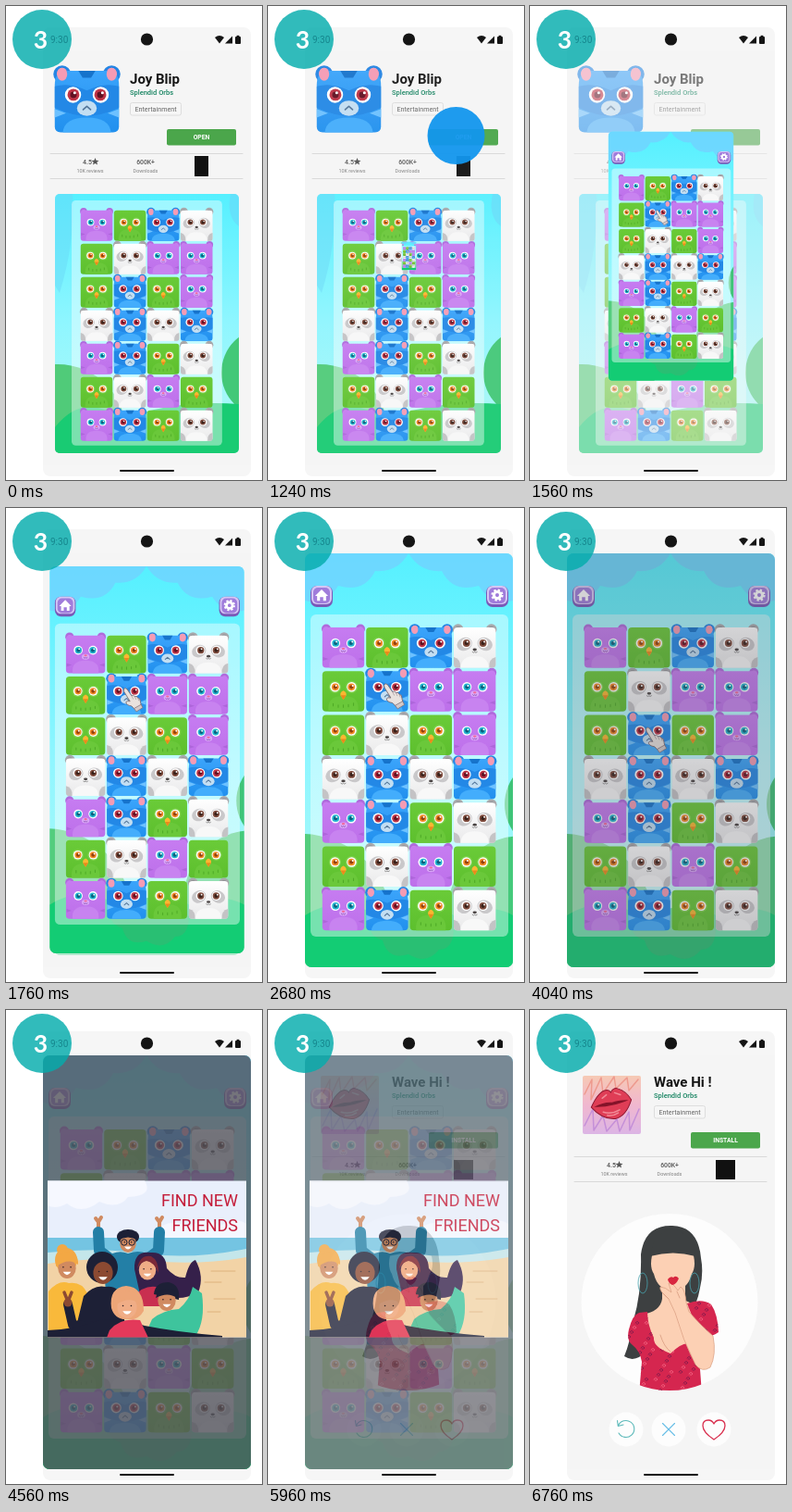
Animation of 277x512 px, one loop 8.44 s. Source, as an HTML page:

```html
<!DOCTYPE html>
<html lang="en">
<head>
<meta charset="utf-8">
<style>
html, body { margin: 0; width: 100%; height: 100%; overflow: hidden; background: #fff; }
svg { display: block; width: 100vw; height: 100vh; font-family: Roboto, sans-serif; }
</style>
</head>
<body>
<svg id="stage" viewBox="0 0 277 512"></svg>
<script>
// Markup helpers
const circle = (x, y, r, fill, more = '') => `<circle cx="${x}" cy="${y}" r="${r}" fill="${fill}" ${more}/>`;
const oval = (x, y, rx, ry, fill, more = '') => `<ellipse cx="${x}" cy="${y}" rx="${rx}" ry="${ry}" fill="${fill}" ${more}/>`;
const rect = (x, y, w, h, r, fill, more = '') => `<rect x="${x}" y="${y}" width="${w}" height="${h}" rx="${r}" fill="${fill}" ${more}/>`;
const path = (d, fill, more = '') => `<path d="${d}" fill="${fill}" ${more}/>`;
const line = (d, color, w = 1, more = '') => `<path d="${d}" fill="none" stroke="${color}" stroke-width="${w}" stroke-linecap="round" stroke-linejoin="round" ${more}/>`;
const text = (x, y, size, fill, str, more = '') => `<text x="${x}" y="${y}" font-size="${size}" fill="${fill}" ${more}>${str}</text>`;
const group = (inner, more = '') => `<g ${more}>${inner}</g>`;
const use = (id, x, y, s = 1, more = '') => `<use href="#${id}" transform="translate(${x} ${y}) scale(${s})" ${more}/>`;
const both = part => part(-1) + part(1);
const gradient = (id, ...colors) => `<linearGradient id="${id}" x2="0" y2="1">${colors.map((c, i) =>
  `<stop offset="${i / (colors.length - 1)}" stop-color="${c}"/>`).join('')}</linearGradient>`;
const mid = 'text-anchor="middle"', bold = 'font-weight="500"';

// Animal tiles, centred on 0,0
const eyes = (x, r, iris, dark) => both(s => circle(s * x, -3, r, '#fff') + circle(s * (x - .3), -3, r * .74, iris) +
  circle(s * (x - .3), -3, r * .4, dark) + circle(s * x + 1.2, -4.4, 1, '#fff'));
const body = fill => rect(-22.7, -20, 45.4, 43.5, 4, fill);

const cat = both(s => circle(s * 18.5, -18.5, 5, '#b06add') + circle(s * 18.5, -18, 2.8, '#c884ec')) +
  body('url(#gCat)') + path('M-15 23.5Q-17 9 0 9Q17 9 15 23.5Z', '#c883f0') +
  eyes(8.6, 5.2, '#21b4cf', '#0c5f7c') + oval(0, 4.5, 4.4, 3.2, '#dba9f8') +
  oval(0, 3, 1.8, 1.1, '#f2699c') + line('M-2.2 5.5Q-1 7 0 5.5Q1 7 2.2 5.5', '#8045a8', .8) +
  both(s => path(`M${s * 22} 12l${-s * 6} 2l${s * 6} 2z`, '#ad66da'));

const owl = body('url(#gOwl)') + path('M-16 23.5Q-18 6 0 7Q18 6 16 23.5Z', '#6ac83a') +
  both(s => circle(s * 9, -3, 6.6, '#7fd24c')) + eyes(9, 5.2, '#f28a25', '#93400d') +
  path('M0 1Q4 3 3 6L0 11L-3 6Q-4 3 0 1Z', '#fbb731') + path('M-3 6h6L0 11Z', '#ea8a1c') +
  line('M-11 15v2.5m5.5 -1v2.5m5.5 -2.5v2.5m5.5 -3v2.5m5.5 -4v2.5', '#4fab27', 1.1);

const mouse = both(s => circle(s * 17.5, -17.5, 6.2, '#2485e4') + oval(s * 17.5, -17.5, 3.8, 4.6, '#f59bb4')) +
  path('M-14 -20H14Q22.7 -20 22.7 -10V19.5Q22.7 23.5 18.5 23.5H-18.5Q-22.7 23.5 -22.7 19.5V-10Q-22.7 -20 -14 -20Z', 'url(#gMouse)') +
  path('M-6 -20H6L3 -15H-3Z', '#1673cb') +
  path('M-22.7 -9Q-12 -12 0 -6Q12 -12 22.7 -9V6Q10 12 0 12Q-10 12 -22.7 6Z', '#2388e6') +
  path('M-17 23.5Q-16 13 0 13Q16 13 17 23.5Z', '#43adfc') +
  both(s => oval(s * 17.5, -17.5, 3.6, 4.6, '#f59bb4') + path(`M${s * 22.7} 7l${-s * 8} 3l${s * 8} 3z`, '#6dc1ff')) +
  eyes(9.8, 5.7, '#bf3346', '#611122') + oval(0, 6.5, 7, 5.4, '#c3def2') + line('M-2.6 7.5L0 5.2L2.6 7.5', '#55779a', 1.1);

const panda = both(s => circle(s * 18, -18, 5.8, '#a8a8ab') + circle(s * 18, -18, 3.2, '#929296')) +
  body('url(#gPanda)') + path('M-15 23.5Q-15 11 0 11Q15 11 15 23.5Z', '#f8f8f8') +
  both(s => oval(s * 11, -2, 8.4, 7, '#c9c8ca', `transform="rotate(${s * 25} ${s * 11} -2)"`) +
    path(`M${s * 22.7} 12q${-s * 8} 2 ${-s * 7} 11.5h${s * 4}q${s * 3} 0 ${s * 3} -4z`, '#c4c3c5')) +
  eyes(9.2, 5.3, '#7d4a3c', '#392019') + oval(0, 4, 2.2, 1.4, '#4b4545') +
  line('M-2.6 6.5Q-1 8 0 6.5Q1 8 2.6 6.5', '#777', .8);

const hand = path('M-8 -11Q-6 -14 -3.5 -11L2 -3Q4 -5 6 -2Q9 -3 10 0Q13 0 13 4L14 9L6 14L2 10Q-5 9 -5 5Q-4 3 0 4L-7.5 -8Z',
  '#e9e2de', 'stroke="#7b6a72" stroke-width="1"') + line('M2 -3l2 4m2 -3l1.5 3.5m2.5 -1.5l1 3', '#a8989c', .8) +
  path('M5 13l9 -5l2 4l-8 5z', '#d3c9c8', 'stroke="#7b6a72" stroke-width=".8"');

// Board
const kinds = { c: 'cat', o: 'owl', m: 'mouse', p: 'panda' };
const rows = ['comp', 'o.cc', 'o.oc', 'pmpm', 'cmop', 'opco', 'cmop'];
const colX = c => 81.5 + 47.4 * c, rowY = r => 149 + 47.3 * r;
const board = rect(46, 115, 214, 348, 6, '#fff', 'opacity=".42"') + rows.map((row, r) => [...row].map((k, c) =>
  k === '.' ? '' : use(kinds[k], colX(c), rowY(r))).join('')).join('');

const roundButton = (x, icon) => group(rect(-12, -11, 24, 23, 7, '#7a59b8') + rect(-11, -11, 22, 20, 6, '#d5c6f4') +
  rect(-9, -9, 18, 17, 5, '#a07cdb') + group(icon, 'transform="scale(.88)"'), `transform="translate(${x} 95)"`);
const house = path('M-8 0L0 -8L8 0H5.5V6H2V1.5H-2V6H-5.5V0Z', '#fff');
const gear = circle(0, -1, 4, 'none', 'stroke="#fff" stroke-width="3.4"') +
  circle(0, -1, 6.2, 'none', 'stroke="#fff" stroke-width="2.6" stroke-dasharray="2.6 2.27"');

const game = rect(40, 49, 225, 447, 7, 'url(#gSky)') + group(
  path('M40 100Q62 106 76 84Q104 92 116 68Q140 70 152 49Q165 70 188 68Q200 92 228 84Q242 106 265 100V49H40Z', '#72d2ff', 'opacity=".8"') +
  circle(307, 320, 51, '#3fc478') + circle(36, 450, 98, '#53cd7d') + circle(275, 434, 80, '#45ca7b') +
  path('M40 440Q80 415 120 442Q170 420 205 442Q240 425 265 440V496H40Z', '#13cc74') +
  path('M112 440Q105 462 124 467Q130 489 152 482Q172 494 185 477Q205 477 200 440Z', '#29bf73'), 'clip-path="url(#screen)"') +
  board + use('panda', colX(1), rowY(2), 1, 'id="pandaMove"') +
  group(use('mouse', 0, 0) + use('hand', 4, 5, .92), 'id="mouseMove"') + roundButton(58, house) + roundButton(248, gear);

// Store pages
const star = path('M0 -4L1.1 -1.2L4 -1L1.8 .8L2.5 3.6L0 2L-2.5 3.6L-1.8 .8L-4 -1L-1.1 -1.2Z', '#555', 'transform="translate(96.5 168)"');
const store = (title, action, rating) =>
  text(134, 84, 15, '#151515', title, 'font-weight="600"') +
  text(134, 95.6, 7.5, '#178461', 'Splendid Orbs', bold) +
  rect(134.5, 104.5, 55, 13.5, 2, '#f6f6f6', 'stroke="#ddd"') + text(162, 113.7, 7.2, '#666', 'Entertainment', mid) +
  rect(174, 133, 75, 17.5, 2, '#4ba64b') + text(211.5, 144.2, 6.8, '#fff', action, mid + ' font-weight="600"') +
  line('M48 159.5H256M48 186.5H256', '#d2d2d2', .8) +
  text(83, 171, 7, '#555', '4.5', bold) + star + text(91, 180, 5.4, '#808080', '10K reviews', mid) +
  text(151, 171, 6.8, '#555', '600K+', mid + ' ' + bold) + text(151, 180, 5.4, '#808080', 'Downloads', mid) + rating;
const sheet = rect(40, 49, 225, 447, 0, '#f5f5f5');

const preview = group(rect(53, 203, 199, 280, 0, 'url(#gSky)') +
  path('M53 203H72Q75 255 58 310L53 302Z', '#6ad9f8', 'opacity=".5"') + path('M243 203H252V238Q238 228 243 203Z', '#6ad9f8', 'opacity=".6"') +
  circle(281, 396, 48, '#43c878') + circle(56, 461, 74, '#50cb79') +
  path('M53 455Q85 415 125 447Q180 425 252 430V483H53Z', '#19cb73') +
  group(board + use('panda', colX(1), rowY(1)) + use('mouse', colX(1), rowY(2)), 'transform="translate(36 122.5) scale(.761)"'),
  'clip-path="url(#card)"');

const gamePage = sheet + group(store('Joy Blip', 'OPEN', rect(204, 162, 15, 22, 0, '#111')) +
  use('mouse', 87.5, 100.5, 1.53) + preview, 'id="gameInfo"');

const lips = rect(57, 72, 63, 63, 2, 'url(#gLips)') +
  line('M59 92L67 76L66 98L77 74L79 91L91 73L93 86L105 74L107 88L117 76', '#ee9a8e', 1.5) +
  line('M59 126L68 108L69 131L79 115L83 132L94 119L97 132L107 111L108 131L118 108', '#c590d8', 1.5) +
  group(path('M-22 1Q-12 -15 -4 -15Q0 -15 1 -12Q5 -17 9 -15Q18 -11 22 -1Q14 16 2 17Q-12 16 -22 1Z', '#df3d56', 'stroke="#8e1730" stroke-width="1"') +
    path('M-19 1Q-7 -3 1 -1Q8 -3 19 -1Q8 2 1 2Q-8 3 -19 1Z', '#841329') +
    line('M-10 8Q-2 12 8 8M-6 12Q0 14 6 11M-9 -7l5 -3m9 -1l6 3', '#f28c98', 1.5), 'transform="translate(88 102) rotate(-8)"');

let dots = '';
for (let i = 0; i < 110; i++) {
  const x = 104 + i * 37 % 101, y = 314 + i * 53 % 98;
  dots += line(`M${x} ${y}q2 -3 4 0q-1 2 -3 1`, i % 3 ? '#8f1c4b' : '#ef5a7a', 1);
}
const dress = 'M118 327Q111 329 107 345Q104 357 111 362Q119 368 121 380L118 415H186L184 388L176 364Q170 354 152 371Q133 364 134 354Q127 340 127 326Z' +
  'M170 317Q186 311 196 318Q203 328 204 348Q196 354 184 352Z';
const skin = '#fcd0b4', ink = '#d99c80';
const woman = group(
  path('M154 233Q124 232 120 264Q121 305 112 335Q108 360 102 374Q114 382 126 368L140 330H172Q181 318 184 300Q188 284 185 268Q182 234 154 233Z', '#3d4041') +
  path('M143 292H168V314Q183 318 182 342L172 384H136Q124 355 121 329Q141 326 143 312Z', skin) +
  path('M134 258Q128 276 134 285Q138 302 154 304Q171 302 175 285Q181 276 175 258Z', skin) +
  path('M130 266Q133 240 154 237Q176 240 179 266Q155 259 130 266Z', '#3d4041') +
  path(dress, '#d5264f') + group(dots, 'clip-path="url(#dress)"') +
  path('M150 312Q139 303 141 299Q146 299 153 305L150 295Q154 294 160 303L163 299Q168 302 169 316L172 326Q186 342 198 352Q202 372 195 386Q186 392 179 383Q165 356 157 327Z', skin, `stroke="${ink}" stroke-width=".7"`) +
  line('M150 312l-6 -6m15 -2l3 7M141 351Q145 364 152 369', ink, .8) +
  path('M149 291Q152 287 155 289Q158 286 161 290Q158 297 154 297Q150 295 149 291Z', '#d8263f') +
  both(s => oval(150 + s * 28, 295, 5, 11, 'none', 'stroke="#4aa3ae" stroke-width=".8"')), 'clip-path="url(#portrait)"');

const datePage = sheet + group(store('Wave Hi !', 'INSTALL', rect(201, 163, 21, 21, 0, '#111')) + lips, 'transform="translate(0 -1)"') +
  circle(151, 315.5, 95.5, '#fdfdfd') + woman + [104, 150, 199].map(x => circle(x, 453, 18.5, '#fdfdfd')).join('') +
  line('M95.5 449A9 9 0 1 1 96 457M94.5 443.5L95.3 449.5L101 448', '#5bb9b9', 1.1) +
  line('M143.5 446.5l13 13m0 -13l-13 13', '#66bde6', 1.1) +
  line('M199 464Q187 456 187 449Q187 443 193 443Q197 443 199 447Q201 443 205 443Q211 443 211 449Q211 456 199 464Z', '#d92f4e', 1.3);

// Beach advert
const face = (x, y, r, tone) => oval(x, y, r * .88, r, tone) +
  both(s => circle(x + s * r * .37, y - r * .12, .8, '#2a1c24')) +
  path(`M${x - r * .4} ${y + r * .35}h${r * .8}q${-r * .4} ${r * .6} ${-r * .8} 0z`, '#fff');
const navy = '#1d2036', brown = '#8c4a32', tan = '#d08a60', pale = '#f0ad86', sweater = '#237fa6';
const advert = group(rect(45, 184, 215, 170, 0, '#e9effc') +
  path('M45 184H150Q160 201 132 202Q122 216 101 207Q82 222 66 209Q54 216 45 211Z', '#f6f8ff') +
  path('M160 241Q176 222 198 235Q218 220 231 234Q246 222 260 231V250H160Z', '#f4f7ff') +
  rect(45, 246, 215, 26, 0, '#74c4e2') + path('M45 262Q100 256 150 263T260 258V277H45Z', '#c4e6ea') +
  path('M45 274Q100 266 155 271T260 267V354H45Z', '#f2d3a6') + line('M215 294h18m-8 18h23m-30 14h14m-10 -44h26', '#deb27d', 1) +
  // man at the back
  both(s => line(`M${133 + s * 33} 238v-10m0 1l-3 -4m3 4l3 -5`, tan, 4) +
    line(`M${133 + s * 33} 240L${133 + s * 32} 260L${133 + s * 16} 272`, sweater, 12)) +
  path('M106 268Q120 258 132 263Q147 257 162 268L160 310H108Z', sweater) +
  oval(132, 245, 12, 8, navy) + face(132, 252, 10, tan) + path('M121 249Q122 238 133 239Q144 239 143 249Q132 242 121 249Z', navy) +
  both(s => circle(132 + s * 4.2, 251, 3.2, 'none', `stroke="${navy}" stroke-width="1"`)) +
  // left pair
  path('M46 304Q57 291 68 295Q82 293 88 306L84 350H46Z', '#f9b93b') + circle(61, 259, 6, '#f3a844') + oval(65, 270, 12, 13, '#f3a844') +
  face(66, 279, 11, tan) + path('M54 277Q53 262 66 261Q79 262 78 275Q68 267 54 277Z', '#f3a844') +
  path('M84 309Q95 296 108 299Q123 297 128 315V350H74Z', navy) + circle(104, 278, 17, navy) + face(105, 284, 12, brown) +
  line('M67 318L72 340L94 342', navy, 10) + line('M67 315l-4 -10m4 10l4 -10', brown, 3.4) + circle(67, 316, 4.5, brown) +
  // woman with long hair
  path('M139 280Q138 259 157 262Q173 261 174 279Q183 290 194 289Q198 272 205 270Q215 288 208 305Q188 316 168 307H145Z', '#35204a') +
  path('M138 310Q150 295 167 300L176 320H138Z', '#c92f50') + face(153, 281, 10.5, pale) +
  path('M142 279Q145 264 157 266Q165 270 165 284Q160 272 152 271Q146 272 142 279Z', '#7b2938') +
  // right man
  path('M158 334Q170 324 187 323Q199 313 202 299L212 306Q216 336 205 352H150Z', '#3ec49d') +
  path('M160 307Q161 294 176 294Q189 297 187 313Z', navy) + face(174, 314, 11, tan) + path('M162 311Q164 300 178 301Q186 303 185 311Q175 304 162 311Z', navy) +
  // front row
  path('M45 354V346Q75 345 101 335Q124 332 150 341Q185 348 234 352V354Z', navy) + path('M112 346Q123 332 145 335L154 354H109Z', '#e3395a') +
  path('M114 322Q111 300 130 298Q149 299 149 325Q143 336 131 334Q118 335 114 322Z', '#eda678') + face(131, 321, 12, pale) +
  path('M118 319Q118 304 132 303Q145 305 145 318Q134 308 118 319Z', '#eda678') +
  ['FIND NEW', 'FRIENDS'].map((w, i) => text(251, 212 + 27 * i, 18, '#c41d3a', w, 'text-anchor="end"')).join(''),
  'clip-path="url(#ad)"');

const status = circle(152.5, 36, 6.6, '#151515') +
  path('M226 34Q231 30 236 34L231 40.5Z', '#151515') + path('M237 40.5H245V32.5Z', '#151515') +
  rect(248, 33, 6, 8, 1, '#151515') + rect(249.6, 31.8, 2.8, 2, 0, '#151515') + line('M124 502H181', '#111', 2);
const badge = circle(39, 36, 32, '#04adad', 'opacity=".82"') + text(48, 39.5, 10, '#15858c', '9:30') +
  text(37.5, 45.5, 26.5, '#fff', '3', mid + ' font-weight="700" style="font-family:Lato,sans-serif"');

const clip = (id, shape) => `<clipPath id="${id}">${shape}</clipPath>`;
const stage = document.getElementById('stage');
stage.innerHTML = '<defs>' +
  gradient('gCat', '#c67cf1', '#bd70ea') + gradient('gOwl', '#6acb38', '#5dbf2e') + gradient('gMouse', '#3ba4fb', '#2190ee') +
  gradient('gPanda', '#fff', '#e9e9ea') + gradient('gSky', '#55f0ff', '#8ff6ff', '#b3f9f4') +
  gradient('gLips', '#f6c9b4', '#f0b7cf', '#dcb5e5') +
  clip('screen', rect(40, 49, 225, 447, 7)) + clip('card', rect(53, 203, 199, 280, 5)) + clip('portrait', circle(151, 315.5, 95.5)) +
  clip('dress', path(dress)) + clip('ad', rect(45, 184.5, 215, 169)) +
  Object.entries({ cat, owl, mouse, panda, hand }).map(([id, art]) => group(art, `id="${id}"`)).join('') + '</defs>' +
  rect(40, 23, 225, 485, 8, '#f6f6f6') + status + gamePage +
  circle(203.5, 140, 31, '#1196ee', 'id="tap"') + group(game, 'id="game"') +
  rect(40, 49, 225, 447, 7, '#52525a', 'id="shade"') + group(advert, 'id="advert"') +
  group(datePage, 'id="datePage"') + badge;

// Motion
const LOOP = 8440;
const set = (id, attrs) => {
  const el = document.getElementById(id);
  for (const k in attrs) el.setAttribute(k, attrs[k]);
};
const ramp = (t, a, b) => Math.min(1, Math.max(0, (t - a) / (b - a)));
const zoom = (s, x, y, cx, cy) => ({
  transform: `translate(${x} ${y}) scale(${s}) translate(${-cx} ${-cy})`,
  visibility: s > 0 ? 'visible' : 'hidden'
});

function draw(t) {
  set('tap', { r: 31 * ramp(t, 600, 1000), opacity: .94 * (1 - ramp(t, 1280, 1520)) });
  set('gameInfo', { opacity: 1 - ramp(t, 1200, 2000) });
  const open = ramp(t, 1200, 1800);
  set('game', zoom(open, 152.5, 270 + 2.5 * open ** 4, 152.5, 272.5));
  const swap = 47.3 * ramp(t, 2680, 3560);
  set('mouseMove', { transform: `translate(${colX(1)} ${rowY(1) + swap})` });
  set('pandaMove', { transform: `translate(${colX(1)} ${rowY(2) - swap})` });
  set('shade', { opacity: .8 * ramp(t, 3800, 4560) });
  set('advert', zoom(ramp(t, 4080, 4560), 152.5, 269, 152.5, 269));
  set('datePage', { opacity: ramp(t, 5800, 6560) });
}

const start = performance.now();
function tick() {
  draw((performance.now() - start) % LOOP);
  requestAnimationFrame(tick);
}
tick();
</script>
</body>
</html>
```
